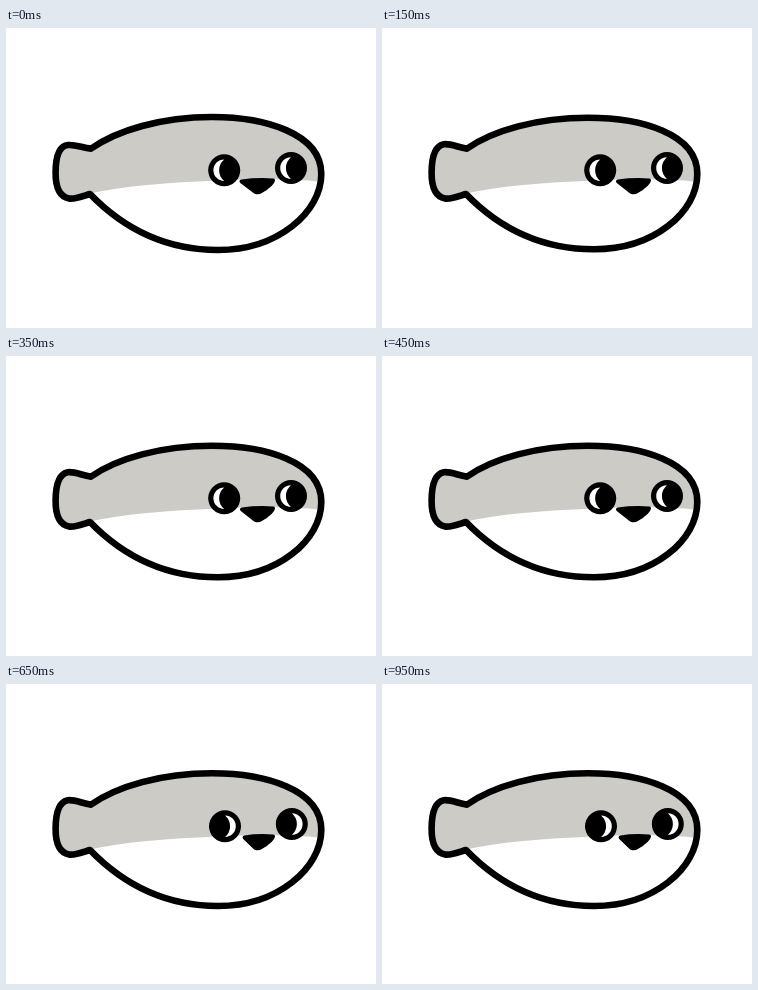
Animation, 370 px wide and 300 px high, one loop 1 s. Source, as an HTML page:

```html
<!DOCTYPE html>
<html lang="en">
<head>
<meta charset="utf-8">
<title>Drifting fish</title>
<style>
  html, body { margin: 0; width: 100%; height: 100%; overflow: hidden; background: #fff; }
  svg { display: block; width: 100vw; height: 100vh; }
</style>
</head>
<body>
<svg viewBox="0 0 370 300">
  <defs>
    <clipPath id="inside"><path id="clip"/></clipPath>
  </defs>
  <path id="belly" fill="#fff"/>
  <path fill="#cccbc6" clip-path="url(#inside)"
    d="M40 80 H325 V155 C290 150 235 151 203 153 C160 154.8 120 157.6 84 165.6 L66 180 H40 Z"/>
  <path id="line" fill="none" stroke="#000" stroke-width="6.6" stroke-linejoin="round"/>
  <g id="eyes"></g>
  <path id="mouth" stroke="#000" stroke-width="4" stroke-linejoin="round"/>
</svg>
<script>
const LOOP = 1000, STEP = 50, TURN = 600;
const $ = id => document.getElementById(id);
const set = (el, attrs) => {
  for (const k in attrs) el.setAttribute(k, attrs[k]);
};

// top, bottom: body edges; fin: tail top; mouth: left corner
const poses = {
  right: [
    { top: 89, bottom: 222, fin: 117, mouth: 235.5 },
    { top: 89.8, bottom: 221.3, fin: 116.2, mouth: 236 }
  ],
  left: [
    { top: 88.8, bottom: 221.3, fin: 116.8, mouth: 238.6 },
    { top: 89.3, bottom: 222, fin: 116.2, mouth: 238.6 }
  ]
};

function add(tag, parent, attrs) {
  const el = document.createElementNS("http://www.w3.org/2000/svg", tag);
  set(el, attrs);
  parent.append(el);
  return el;
}

const eyes = [[218.6, 142.2], [285.4, 140]].map(([x, y]) => {
  const el = add("g", $("eyes"), {});
  add("circle", el, { r: 16 });
  add("path", el, { d: "M0 -10.8 A10.8 10.8 0 0 0 0 10.8 A14 14 0 0 1 0 -10.8 Z", fill: "#fff" });
  return { x, y, el };
});

const outline = ({ top, bottom, fin }) =>
  `M85 120.6 C111 102.4 155 ${top} 206 ${top} C258 ${top} 315.3 105 315.3 146` +
  ` C315.3 184 272 ${bottom} 212 ${bottom} C158 ${bottom} 116.5 199.5 84 166` +
  ` C76 168.5 69 171.5 63 170.5 C53 168.5 49.6 158 49.6 145 C49.6 132 51.6 118 62 ${fin}` +
  ` C70 ${fin - 0.6} 76 119.6 85 120.6 Z`;

function draw(pose, look) {
  const d = outline(pose);
  for (const id of ["belly", "clip", "line"]) set($(id), { d });
  set($("mouth"), { d: `M${pose.mouth} 153.5 Q252 151.3 267 152.5 Q266.5 156.5 254.5 163.6 Q252 165 249 163.6 Z` });
  for (const { x, y, el } of eyes)
    set(el, { transform: `translate(${x - look * 0.4} ${y}) scale(${look} 1)` });
}

let shown = -1;
function frame(now) {
  const n = Math.floor((now % LOOP) / STEP);
  if (n !== shown) {
    shown = n;
    const right = n * STEP < TURN;
    draw(poses[right ? "right" : "left"][n % 2], right ? 1 : -1);
  }
  requestAnimationFrame(frame);
}
frame(0);
</script>
</body>
</html>
```
